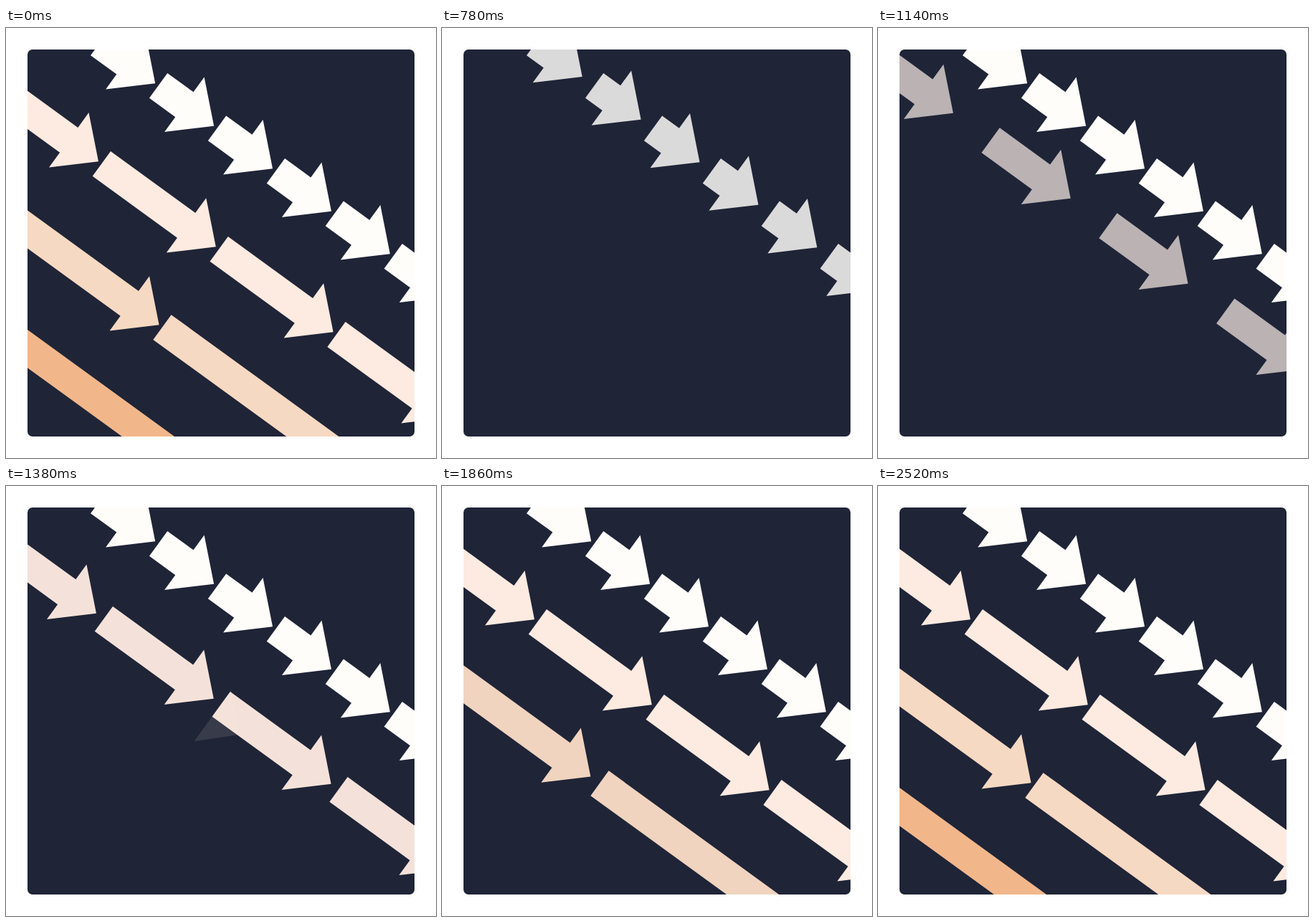
An HTML page for the animation above (4500 ms loop, 600 by 600 pixels).

```html
<!DOCTYPE html>
<html lang="en">
<head>
<meta charset="utf-8">
<title>Growing arrows</title>
<style>
  html, body { margin: 0; width: 100%; height: 100%; overflow: hidden; background: #fff; }
  svg { display: block; width: 100vw; height: 100vh; }
</style>
</head>
<body>
<svg viewBox="0 0 600 600">
  <clipPath id="card"><rect x="30" y="30" width="540" height="540" rx="7"/></clipPath>
  <rect x="30" y="30" width="540" height="540" rx="7" fill="#1f2437"/>
  <g clip-path="url(#card)">
    <g id="rows" transform="translate(300 300) rotate(36)"></g>
  </g>
</svg>
<script>
const LOOP = 4500, STEP = 30, LAG = 2;
const FIRST = 450, STAGGER = 450, DURATION = 720;
const PITCH = 101.25, GAP = 5.4, REACH = 405;
const TOP = -126.3, ROW_STEP = 134.8;
const SHAFT = 21.5, BARB = 47.2, HEAD = 51;
const COLORS = [[255, 253, 250], [253, 234, 224], [246, 217, 194], [241, 183, 139]];

const rows = COLORS.map(() => {
  const path = document.createElementNS("http://www.w3.org/2000/svg", "path");
  document.getElementById("rows").append(path);
  return path;
});

const mix = (a, b, p) => a + (b - a) * p;
const easeOut = p => 1 - (1 - p) ** 3;

// A short arrow is all head; its barbs widen until the head is full length.
function arrow(x, y, length) {
  const head = Math.min(length, HEAD);
  const barb = mix(SHAFT, BARB, head / HEAD);
  const neck = x + length - head;
  const points = [
    [x, y - SHAFT], [neck, y - SHAFT], [neck, y - barb], [x + length, y],
    [neck, y + barb], [neck, y + SHAFT], [x, y + SHAFT]
  ];
  return "M" + points.map(p => p.map(n => n.toFixed(2)).join(" ")).join("L") + "Z";
}

function drawRow(path, i, time) {
  const linear = (time - FIRST - i * STAGGER) / DURATION;
  const p = easeOut(Math.min(1, Math.max(0, linear)));
  const from = Math.max(0, i - 1);
  const pitch = PITCH * 2 ** i;
  const y = TOP + ROW_STEP * mix(from, i, p);
  let d = "";
  if (p > 0) {
    for (let x = -REACH; x < REACH; x += pitch) {
      d += arrow(x + GAP / 2, y, (pitch - GAP) * p);
    }
  }
  const color = COLORS[i].map((c, k) => Math.round(mix(COLORS[from][k], c, p)));
  path.setAttribute("d", d);
  path.setAttribute("fill", `rgb(${color})`);
  path.setAttribute("fill-opacity", p);
}

function draw(ms) {
  const tick = Math.floor((ms % LOOP) / STEP) * STEP;
  const time = (tick - LAG + LOOP) % LOOP;
  rows.forEach((path, i) => drawRow(path, i, time));
}

const start = performance.now();
function frame() {
  draw(performance.now() - start);
  requestAnimationFrame(frame);
}
frame();
</script>
</body>
</html>
```
